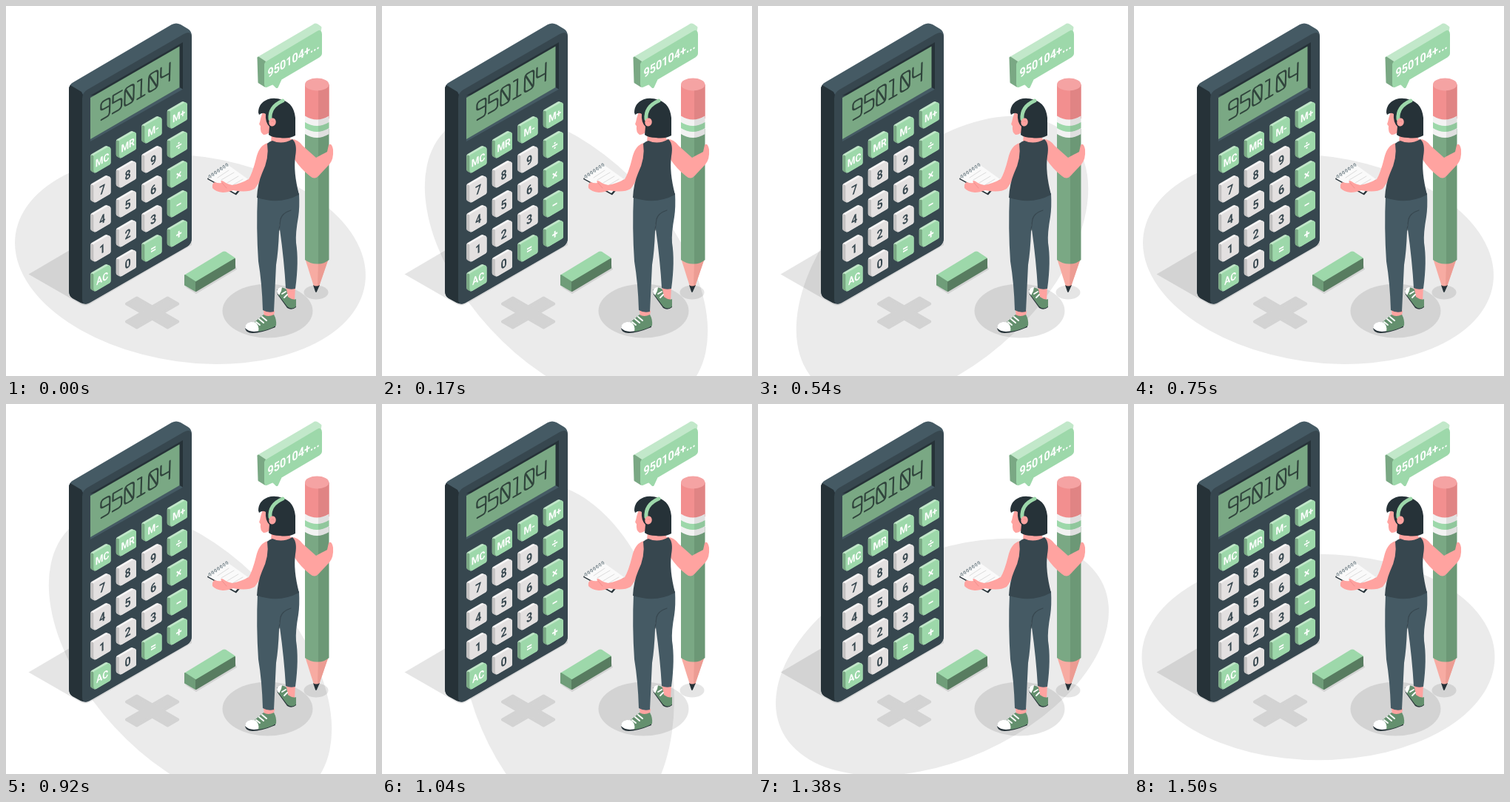
These frames come from a looping animation (500 by 500 pixels, 1540 ms). An HTML page with a canvas:

```html
<!DOCTYPE html>
<html lang="en">
<head>
<meta charset="utf-8">
<title>Calculator</title>
<style>
  html, body { margin: 0; width: 100%; height: 100%; overflow: hidden; background: #fff; }
  canvas { display: block; width: 500px; height: 500px; }
</style>
</head>
<body>
<canvas id="stage"></canvas>
<script>
const canvas = document.getElementById('stage');
const ctx = canvas.getContext('2d');
const dpr = window.devicePixelRatio || 1;
canvas.width = canvas.height = 500 * dpr;
ctx.scale(dpr, dpr);
ctx.lineJoin = ctx.lineCap = 'round';

const LOOP = 1540, FRAMES = 37, FIRST_TURN = 8, STEP = 9.86;
const SLOPE = -0.577;
const INK = '#263238', SLATE = '#37474f', STEEL = '#455a64';
const MINT = '#9dd8aa', PALE = '#c2e8ca', SAGE = '#7aa884', MOSS = '#64906e';
const SKIN = '#ffa3a0', SHADE = 'rgba(0,0,0,.1)';

function fill(color, d) {
  ctx.fillStyle = color;
  ctx.fill(new Path2D(d));
}

function line(color, width, d) {
  ctx.strokeStyle = color;
  ctx.lineWidth = width;
  ctx.stroke(new Path2D(d));
}

function soft(color, width, d) {
  fill(color, d);
  line(color, width, d);
}

function oval(color, x, y, rx, ry, angle = 0) {
  ctx.fillStyle = color;
  ctx.beginPath();
  ctx.ellipse(x, y, rx, ry, angle, 0, Math.PI * 2);
  ctx.fill();
}

function isoText(text, x, y, size, color) {
  ctx.save();
  ctx.transform(0.87, -0.5, 0, 1, x, y);
  ctx.font = `700 ${size}px Roboto, sans-serif`;
  ctx.textAlign = 'center';
  ctx.textBaseline = 'alphabetic';
  ctx.fillStyle = color;
  ctx.fillText(text, 0, size * 0.36);
  ctx.restore();
}

function drawFloor(n) {
  // Two half turns, then one level pose before the loop restarts
  const turn = n === FRAMES - 1 ? 0 : FIRST_TURN + (n % 18) * STEP;
  oval('#ebebeb', 249, 342, 238.5, 139.3, turn * Math.PI / 180);
  fill(SHADE, 'M85 330.5 30.5 362.5 101 403Q107 406 113 403L251 323V317L105 399Z');
  oval(SHADE, 353.5, 412, 61, 36.5);
  oval(SHADE, 419, 387, 16.5, 9.5);
  fill(SHADE, 'M241 379 257 389 312 356 310 350 257 384Z');
  drawCross(197.6, 414.6, 32, 8);
}

function drawCross(cx, cy, arm, half) {
  const iso = (u, v) => `${cx + 0.866 * (u + v)} ${cy + 0.5 * (u - v)}`;
  const corners = [[arm, half], [half, half], [half, arm], [-half, arm], [-half, half], [-arm, half],
    [-arm, -half], [-half, -half], [-half, -arm], [half, -arm], [half, -half], [arm, -half]];
  soft('#d3d3d3', 4, 'M' + corners.map(c => iso(...c)).join('L') + 'Z');
}

const KEYS = [
  ['MC', 'MR', 'M-', 'M+'],
  ['7', '8', '9', '÷'],
  ['4', '5', '6', '×'],
  ['1', '2', '3', '−'],
  ['AC', '0', '=', '+']
];

function drawKey(label, x, y) {
  const green = !/^\d$/.test(label);
  const [face, side, top] = green ? [MINT, SAGE, PALE] : ['#e3e0e0', '#c3c1c1', '#f7f5f5'];
  ctx.save();
  ctx.translate(x, y);
  soft(top, 6, 'M-12.5 -5 5.5 -15.5 8.7 -14V4L-9.5 15 -12.5 13Z');
  soft(side, 4, 'M-13.5 -4 -11 -2V15.5L-13.5 14Z');
  soft(face, 6, 'M-8.5 -4.2 8.7 -14V4.3L-8.5 14.5Z');
  ctx.restore();
  isoText(label, x + 0.3, y + 0.4, label.length > 1 ? 14 : 16.5, green ? '#fff' : SLATE);
}

const DIGITS = {
  9: 'M12 -13H4Q0 -13 0 -17V-20Q0 -24 4 -24H8Q12 -24 12 -20V-4Q12 0 8 0H1',
  5: 'M12 -24H0V-14H8Q12 -14 12 -10V-4Q12 0 8 0H0',
  0: 'M4 -24H8Q12 -24 12 -20V-4Q12 0 8 0H4Q0 0 0 -4V-20Q0 -24 4 -24ZM1 -22 11 -2',
  1: 'M1 -24H6V0M1 0H11',
  4: 'M0 -24V-14Q0 -10 4 -10H12M12 -24V0'
};

function drawCalculator() {
  fill(STEEL, 'M85 113Q85 106 91 103L224 25Q230 22 236 25L246 31Q251 34 251 41V314Q251 321 245 325L113 401Q107 404 101 401L90 395Q85 392 85 385Z');
  fill(INK, 'M85 113Q85 109 87 107L102 116 105 122V402L101 401 90 395Q85 392 85 385Z');
  fill(SLATE, 'M103 125Q103 117 110 113L240 38Q251 32 251 43V314Q251 321 245 325L113 401Q103 406 103 396Z');
  fill(INK, 'M114 121 239 49V113L234 110Z');
  fill(STEEL, 'M114 180 234.5 110 239 112.5 114 183Z');
  fill(SAGE, 'M114 124 234.5 54.5V110L114 180Z');

  [...'950104'].forEach((digit, i) => {
    ctx.save();
    ctx.translate(127.8 + i * 16.2, 154.5 + i * 16.2 * SLOPE);
    ctx.transform(1, SLOPE, -0.03, 1, 0, 0);
    line('#30443c', 2.2, DIGITS[digit]);
    ctx.restore();
  });

  KEYS.forEach((row, r) => row.forEach((label, c) =>
    drawKey(label, 129.8 + c * 34.5, 207.5 + r * 40 - c * 20)));
}

function drawEraser() {
  soft(MINT, 2, 'M242 364 293 333Q295 332 297 333L309 341 257 373Z');
  soft('#6f9d79', 2, 'M242 364 256 373V385L242 377Z');
  soft('#587c60', 2, 'M257 373 309 342V354L257 385Z');
}

function drawPencil() {
  fill('#f7aba2', 'M404 341 416 379Q419 381 423 379L436 341Z');
  fill('#ec9c93', 'M422 345 421 380 423 379 436 341Z');
  fill(INK, 'M415 377Q419 380 424 377L420 386Q419 388 418 386Z');
  fill(SAGE, 'M404 166H422V348.5Q412 349 404 343Z');
  fill('#6c9876', 'M422 166H436.5V343Q430 348.5 422 348.5Z');
  fill('#f28f8f', 'M404 106H436.5V152Q420 162 404 152Z');
  fill('#e08484', 'M422 106H436.5V152Q431 157 422 157Z');
  fill('#f2f2f2', 'M404 148.5Q420 158.5 436.5 148.5V173Q420 183 404 173Z');
  fill(MINT, 'M404 157Q420 167 436.5 157V165Q420 175 404 165Z');
  fill('rgba(0,0,0,.08)', 'M422 153.5Q431 153 436.5 148.5V173Q431 177 422 178Z');
  oval('#f5a3a3', 420.2, 106, 16.2, 8.4);
}

function drawNotebook() {
  fill(INK, 'M272 234 311 255.5 327 237 326 234 310 252 273 232Z');
  fill('#fafafa', 'M273 233 299 214 327 234 310 253Z');
  line('#dcdcdc', 1, 'M286 232 301 222M291 235 308 225M299 239 314 230M305 243 320 234');
  for (let i = 0; i < 7; i++) {
    const x = 275 + i * 3.8, y = 232 - i * 2.6;
    line(STEEL, 0.8, `M${x} ${y}Q${x - 2} ${y - 4} ${x + 0.5} ${y - 3.5}Q${x + 2} ${y - 3} ${x + 2} ${y}`);
  }
}

function drawShoes() {
  fill(SKIN, 'M348 410 363 412 361 424 349 422Z');
  fill(SKIN, 'M378 379 391 379 390 399 381 394Z');
  fill(INK, 'M323 435Q324 442 333 442Q345 442 364 434V429L324 432Z');
  fill('#fff', 'M323 435Q323 429 331 427L342 428 346 438Q330 443 323 435Z');
  fill(MOSS, 'M336 427 348 417Q354 421 362 417Q366 424 365 432Q355 438 341 440Q343 431 336 427Z');
  line('#fff', 2, 'M338 427 343 431M342 423 348 428M346 420 352 425');
  fill(INK, 'M366 383 367 390 380 408Q386 412 392 407V402Z');
  fill(MOSS, 'M367 383Q373 378 379 383L381 393Q388 398 392 396V406Q386 411 380 406L368 390Z');
  fill('#fff', 'M366 385Q368 380 373 380L372 385 369 391Q366 388 366 385Z');
  line('#fff', 1.8, 'M373 389 378 386M376 394 380 390');
}

function drawWoman() {
  drawNotebook();
  drawShoes();
  fill(STEEL, 'M370 257 396 253Q397 272 395 285Q391 307 392 320Q396 345 391 382Q384 384 378 381Q376 345 370 302Z');
  fill(STEEL, 'M340 256 393 254Q388 274 371 283L369 305Q368 332 365 350L362 413Q354 415 347 411Q346 375 341 345Q338 300 340 256Z');
  line(SLATE, 1.2, 'M385 276Q373 280 371 288L369 303');

  // Arms
  fill(SKIN, 'M354 185Q342 188 338 206Q333 226 328 234Q317 240 306 242Q299 241 294 237Q289 234 291 239Q287 240 282 238Q278 240 279 246Q283 251 293 252Q299 252 307 249Q326 253 336 247Q345 236 358 205Z');
  fill(SKIN, 'M384 180Q394 179 401 189L419 205Q428 200 434 197L436 188Q440 184 442 194Q443 207 437 214L422 230Q417 235 411 230Q398 220 389 206Z');
  line('#f28f8f', 1, 'M292 239 298 246');

  fill(SKIN, 'M359 172H380L386 182 373 188 358 184Z');
  fill(SLATE, 'M360 182Q373 188 387 180Q394 186 391 203Q388 224 396 255Q370 269 339 259Q340 240 346 226Q356 206 353 186Q356 183 360 182Z');

  // Head
  fill(SKIN, 'M347 143Q344 151 343 157Q341 160 344 162Q343 171 348 174Q353 174 357 170L372 148Z');
  fill(INK, 'M341 144Q341 131 354 126Q363 123 374 127Q389 132 391 151L391 175Q382 180 370 178Q360 178 355 174L356 163Q350 157 351 146Q347 143 342 147Z');
  line(MINT, 5, 'M357 153Q355.5 136 374 128');
  oval(SKIN, 360, 157, 4.7, 5.6, 0.2);
  line('#f28f8f', 1, 'M359 156Q361 154 362 157');
}

function drawBubble() {
  soft(PALE, 3, 'M341 70 416 26Q418 24 421 26L425 29 424 35 352 77Z');
  soft(SAGE, 3, 'M341 70 350 76V108L342 103Z');
  fill(SAGE, 'M356 102 366 111 368 100Z');
  soft(MINT, 4, 'M352 77 421 36Q425 33 425 38V64Q425 66 422 68L371 98 366 109 361 104 352 108Q351 108 351 105V79Z');
  isoText('950104+...', 388.5, 71, 16.6, '#fff');
}

function drawScene(n) {
  ctx.fillStyle = '#fff';
  ctx.fillRect(0, 0, 500, 500);
  drawFloor(n);
  drawCalculator();
  drawEraser();
  drawPencil();
  drawWoman();
  drawBubble();
}

const start = performance.now();
let shown = -1;

function tick() {
  const time = (performance.now() - start) % LOOP;
  const n = Math.min(FRAMES - 1, Math.floor((time + 4.9) * 24 / 1000));
  if (n !== shown) drawScene(shown = n);
  requestAnimationFrame(tick);
}
tick();
</script>
</body>
</html>
```
